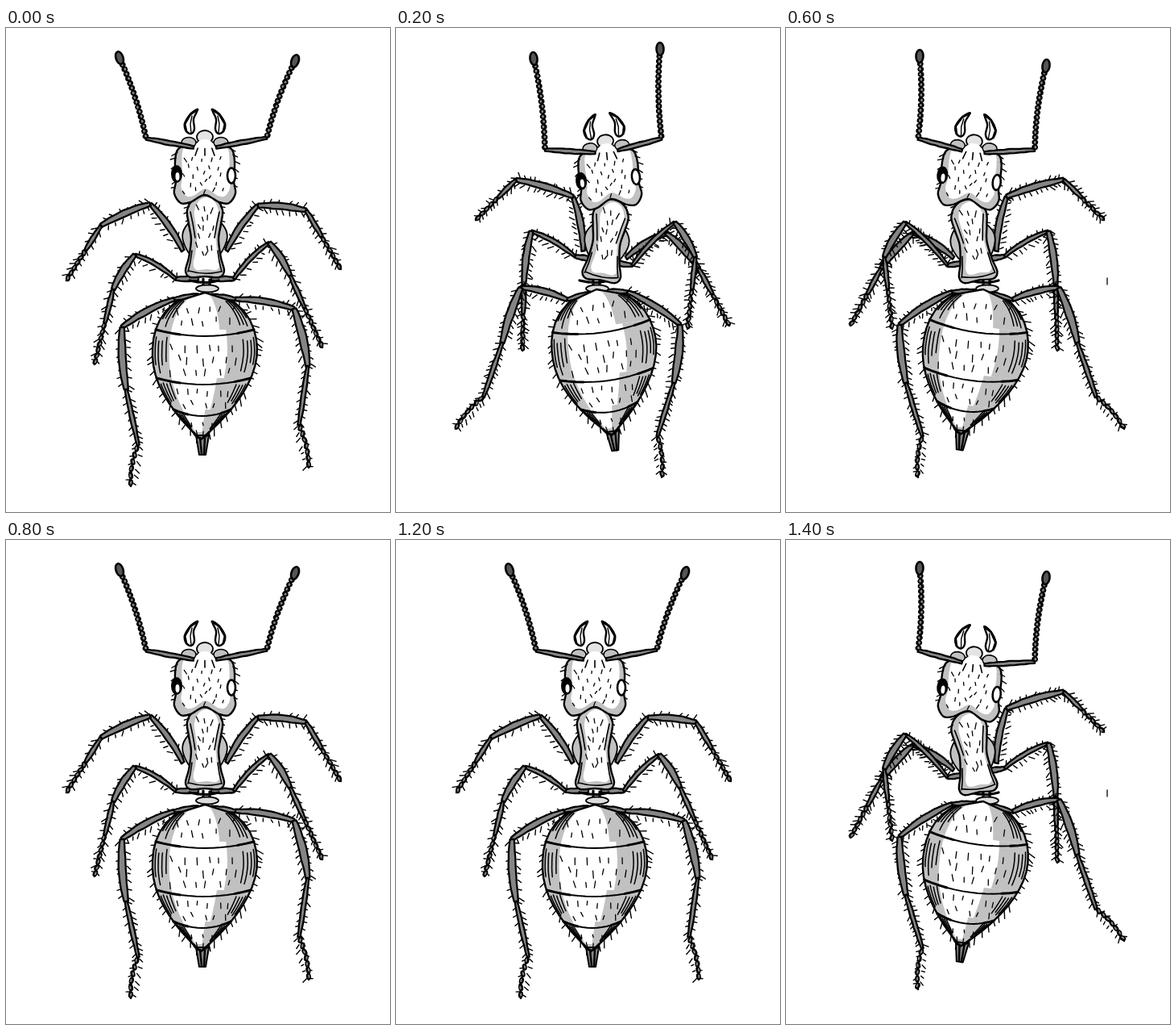
These frames come from a looping animation (477 by 600 pixels, 1.6 s). An HTML page:

```html
<!DOCTYPE html>
<html lang="en">
<head>
<meta charset="utf-8">
<title>Walking ant</title>
<style>
html, body { margin: 0; width: 100%; height: 100%; overflow: hidden; background: #fff; }
svg { display: block; }
</style>
</head>
<body>
<svg id="stage" width="477" height="600" viewBox="0 0 477 600"></svg>
<script>
const NS = 'http://www.w3.org/2000/svg';
const stage = document.getElementById('stage');
const INK = '#000', LIGHT = '#c1c1c1', DARK = '#858585';
const STEP = 200, AXIS = 247;

let seed = 7;
function rnd() {
  seed = (seed * 16807) % 2147483647;
  return seed / 2147483647;
}
const jitter = r => (rnd() - 0.5) * 2 * r;
const range = (n, fn) => Array.from({ length: n }, (_, i) => fn(i));
const lerp = (a, b, t) => [a[0] + (b[0] - a[0]) * t, a[1] + (b[1] - a[1]) * t];
const fmt = p => p.map(v => v.toFixed(1)).join(' ');
const poly = pts => 'M' + pts.map(fmt).join('L');

function add(parent, tag, attrs) {
  const node = document.createElementNS(NS, tag);
  for (const k in attrs) node.setAttribute(k, attrs[k]);
  if (parent) parent.appendChild(node);
  return node;
}
const fill = (g, d, color) => add(g, 'path', { d, fill: color });
const line = (g, d, width = 1.6) => add(g, 'path', {
  d, fill: 'none', stroke: INK, 'stroke-width': width,
  'stroke-linecap': 'round', 'stroke-linejoin': 'round'
});
const shape = (g, d, color, width = 2) => add(g, 'path', {
  d, fill: color, stroke: INK, 'stroke-width': width, 'stroke-linejoin': 'round'
});
const ellipse = (g, cx, cy, rx, ry, color, width = 0) => add(g, 'ellipse', {
  cx, cy, rx, ry, fill: color, stroke: INK, 'stroke-width': width
});

// Closed smooth curve through the points.
function smooth(pts) {
  const n = pts.length, at = i => pts[(i + n) % n];
  const pull = (i, s) => at(i).map((v, k) => v + s * (at(i + 1)[k] - at(i - 1)[k]) / 6);
  return 'M' + fmt(at(0)) + range(n, i => `C${fmt(pull(i, 1))} ${fmt(pull(i + 1, -1))} ${fmt(at(i + 1))}`).join('') + 'Z';
}
// Points given as distance from the body axis, placed on one side.
const onSide = (pts, side) => pts.map(([x, y]) => [AXIS + side * x, y]);
const bilateral = half => smooth([...onSide(half, 1), ...onSide(half.slice(1, -1).reverse(), -1)]);

// Point and unit normal on a line bowed sideways.
function bowed(a, b, bow, t) {
  const dx = b[0] - a[0], dy = b[1] - a[1], m = Math.hypot(dx, dy) || 1;
  const normal = [-dy / m, dx / m], lift = bow * 4 * t * (1 - t), [x, y] = lerp(a, b, t);
  return { p: [x + normal[0] * lift, y + normal[1] * lift], normal, length: m };
}

// Bristles of uneven length on one side of a path.
function bristles(g, pts, step, size, side, offset = 0) {
  const path = add(null, 'path', { d: poly(pts) }), length = path.getTotalLength();
  let out = '';
  for (let s = step * rnd(); s < length - 1; s += step * (0.7 + rnd() * 0.6)) {
    const a = path.getPointAtLength(s), b = path.getPointAtLength(s + 1);
    const ux = b.x - a.x, uy = b.y - a.y, nx = -uy * side, ny = ux * side;
    const lean = 0.6 + jitter(0.5), len = size * (0.6 + rnd() * 0.7);
    out += `M${fmt([a.x + nx * offset, a.y + ny * offset])}l${fmt([(nx + ux * lean) * len, (ny + uy * lean) * len])}`;
  }
  line(g, out, 1.4);
}

// Short hairs scattered in a grid, splaying away from the axis.
function fur(g, id, halfWidth, y0, y1, dx, dy, size) {
  let out = '', row = 0;
  for (let y = y0; y <= y1; y += dy, row++) {
    for (let x = -halfWidth + (row % 2) * dx / 2; x <= halfWidth; x += dx) {
      const lean = -x / halfWidth * 1.5 + jitter(2);
      out += `M${fmt([AXIS + x + jitter(3), y + jitter(3)])}l${fmt([lean, size * (0.7 + rnd() * 0.5)])}`;
    }
  }
  line(g, out, 1.3).setAttribute('clip-path', `url(#${id}Clip)`);
}

const defs = add(stage, 'defs', {});
function part(id, outline) {
  add(add(defs, 'clipPath', { id: id + 'Clip' }), 'path', { d: outline });
  const g = add(defs, 'g', { id });
  return { g, shade: add(g, 'g', { 'clip-path': `url(#${id}Clip)` }) };
}
// Grey body with a smaller copy of the outline as its highlight.
function roundShade(g, d, cy, sx, sy, dx, dy) {
  fill(g, d, LIGHT);
  fill(g, d, '#fff').setAttribute('transform',
    `translate(${AXIS + dx} ${cy + dy}) scale(${sx} ${sy}) translate(${-AXIS} ${-cy})`);
}

function makeHead() {
  const half = [[0, 142], [14, 142], [33, 150], [37, 166], [36, 190], [38, 205], [30, 217], [18, 216], [0, 207]];
  const jaw = [[9, 101], [18, 107], [25, 119], [23, 128], [17, 131], [13, 125], [14, 113]];
  const outline = bilateral(half);
  const { g, shade } = part('head', outline);
  roundShade(shade, outline, 180, 0.8, 0.9, 1, -5);
  for (const side of [1, -1]) {
    bristles(g, onSide(half.slice(2, 6), side), 9, 5, -side);
    const d = smooth(onSide(jaw, side));
    shape(g, d, '#fff', 2.4);
    line(g, poly(onSide(jaw.slice(0, 4), side)), 2.8);
    line(g, poly(onSide([[16, 109], [18, 119], [17, 130]], side)), 1.4);
  }
  line(g, outline, 2.4);
  fur(g, 'head', 26, 160, 201, 12, 10, 4);
  for (const k of [-1, 0, 1]) line(g, poly([[AXIS + k * 7, 144], [AXIS + k * 12, 158]]));
  ellipse(g, AXIS, 135, 10, 8, '#e4e4e4', 1.8);
  for (const side of [1, -1]) ellipse(g, AXIS + side * 20, 142, 9, 6.5, LIGHT, 1.6);
  fill(g, smooth([[AXIS - 11, 148], [AXIS - 7, 140], [AXIS, 138], [AXIS + 7, 140], [AXIS + 11, 148]]), '#fff');
  ellipse(g, 212, 181, 7, 11, INK);
  ellipse(g, 213, 184, 2.5, 5, '#fff');
  ellipse(g, 280, 183, 5, 9.5, '#fff', 2.6);
}

function makeThorax() {
  const half = [[0, 207], [14, 212], [22, 226], [20, 243], [17, 262], [20, 285], [24, 301], [18, 309], [0, 308]];
  const outline = bilateral(half);
  const { g, shade } = part('thorax', outline);
  for (const side of [1, -1]) {
    g.prepend(shape(g, smooth(onSide([[17, 242], [26, 250], [27, 264], [18, 279]], side)), LIGHT, 1.8));
    bristles(g, onSide(half.slice(1, 4), side), 8, 4, -side);
    line(g, poly(onSide([[18, 228], [15, 242], [12, 260]], side)));
    line(g, poly(onSide([[16, 276], [18, 290], [21, 302]], side)));
  }
  roundShade(shade, outline, 258, 0.68, 0.88, 2, -3);
  line(g, outline, 2.4);
  line(g, `M${AXIS - 20} 301Q${AXIS} 307 ${AXIS + 20} 302`);
  fur(g, 'thorax', 11, 220, 290, 11, 12, 6);
}

// Egg-shaped abdomen: x at height y, for k from -1 (left edge) to 1 (right edge).
const TOP = 328, WIDEST = 402, TAIL = 510;
function egg(k, y) {
  const u = (y - WIDEST) / (TAIL - WIDEST), v = (WIDEST - y) / (WIDEST - TOP);
  const half = 65 * (v > 0 ? Math.sqrt(1 - v ** 2.2) : 1 - u ** 1.9);
  return [AXIS - Math.max(0, u) * 5 + k * half, y];
}
const meridian = (k, y0, y1) => range(17, i => egg(k, y0 + (y1 - y0) * i / 16));
const band = y => range(13, i => {
  const k = i / 6 - 1, [x] = egg(k, y);
  return [x, y + 8 * (1 - k * k)];
});

function makeGaster() {
  const seams = [TOP, 374, 434, 473, 501];
  const shadeFrom = [0.3, 0.43, 0.28, 0.1];
  const outline = poly([...meridian(1, TOP, TAIL), ...meridian(-1, TAIL, TOP)]) + 'Z';
  const { g, shade } = part('gaster', outline);
  shape(g, `M236 505L240 529H248L252 505Z`, DARK);
  line(g, 'M241 508L243 528M247 508L246 529', 2.4);
  fill(shade, outline, '#fff');
  seams.forEach((y, i) => {
    const y1 = seams[i + 1] || TAIL, from = shadeFrom[i] ?? -1;
    for (const [a, b] of [[-1, -0.68], [from, 1]]) {
      fill(shade, poly([...meridian(a, y, y1), ...meridian(b, y1, y)]) + 'Z', LIGHT);
    }
  });
  for (const side of [1, -1]) {
    bristles(g, meridian(side, 345, TAIL - 2), 9, 6, -side);
    seams.slice(0, 4).forEach((y, i) => {
      const gap = seams[i + 1] - y;
      for (const k of [0.95, 0.89, 0.82, 0.74]) {
        const start = y + gap * (0.14 + rnd() * 0.1), end = y + gap * (0.65 + rnd() * 0.28);
        line(shade, poly(meridian(side * k, start, end)), 1.5);
      }
    });
  }
  line(g, outline, 2.4);
  seams.slice(1).forEach(y => {
    const seam = band(y);
    line(g, poly(seam), 2);
    for (const end of [seam.slice(0, 4), seam.slice(-3)]) line(g, poly(end), 3);
  });
  fur(g, 'gaster', 38, 346, 368, 15, 15, 7);
  fur(g, 'gaster', 42, 392, 426, 15, 16, 8);
  fur(g, 'gaster', 34, 450, 468, 13, 14, 6);
  fur(g, 'gaster', 14, 488, 498, 10, 10, 5);
}

function bone(g, a, b, w, bow = 0) {
  const edge = side => range(11, i => {
    const t = i / 10, { p, normal } = bowed(a, b, bow, t);
    const r = side * (w * (0.6 + 0.45 * Math.sin(Math.PI * t)) + jitter(0.3));
    return [p[0] + normal[0] * r, p[1] + normal[1] * r];
  });
  shape(g, poly([...edge(1), ...edge(-1).reverse()]) + 'Z', DARK, 2.3);
}

function beads(g, a, b, size, step, bow = 0) {
  const n = Math.max(2, Math.round(bowed(a, b, 0, 0).length / step));
  line(g, poly(range(n + 1, i => bowed(a, b, bow, i / n).p)), 2.5);
  range(n, i => {
    const { p, normal } = bowed(a, b, bow, (i + 0.5) / n);
    const turn = Math.atan2(-normal[0], normal[1]) * 180 / Math.PI + jitter(25);
    const bead = add(g, 'g', { transform: `translate(${fmt(p)}) rotate(${turn.toFixed(0)})` });
    ellipse(bead, 0, 0, step * 0.55, size, INK);
    ellipse(bead, 0, jitter(0.8), step * 0.28, size * 0.36, DARK);
  });
}

// Half widths of femur and tibia for front, middle and hind legs.
const GIRTH = [[3.6, 3.8], [2.6, 3.8], [3.6, 4.4]];

function leg(g, rank, side, [hip, knee, ankle, toe], gap) {
  const hind = rank === 2, [femur, tibia] = GIRTH[rank];
  const split = bowed(ankle, toe, hind ? side * 12 : 0, hind ? 0.58 : 0.45).p;
  const hairy = (a, b, w) => {
    for (const s of [1, -1]) bristles(g, [a, b], gap, 4.5, s, w);
  };
  hairy(hip, knee, femur);
  hairy(knee, ankle, tibia);
  hairy(ankle, split, 2.4);
  hairy(split, toe, 2);
  bone(g, hip, knee, femur, side * -3);
  bone(g, knee, ankle, tibia, side * -2);
  bone(g, ankle, split, 2.5);
  beads(g, split, toe, 3, 8, hind ? side * -3 : 0);
}

function antenna(g, side, base, elbow, tip) {
  bone(g, base, elbow, 2.6);
  beads(g, elbow, tip, 3.9, 6.2, side * -3);
  const { normal } = bowed(elbow, tip, 0, 1);
  const turn = Math.atan2(-normal[0], normal[1]) * 180 / Math.PI;
  const bulb = add(g, 'g', { transform: `translate(${tip}) rotate(${turn.toFixed(0)})` });
  ellipse(bulb, 0, 0, 8, 4.5, '#555', 2.6);
}

const PIVOT = { gaster: [247, 328], thorax: [247, 258], head: [247, 182] };

// Each part has a shift and a turn. A leg has a knee, ankle and toe, front to
// hind; an antenna has an elbow and tip. The left side comes first.
const still = {
  head: [0, 0, 0], thorax: [0, 0, 0], gaster: [0, 0, 0], coxa: 311, gap: 9,
  antennae: [[[174, 137], [141, 37]], [[324, 136], [359, 41]]],
  legs: [
    [[[179, 218], [118, 245], [75, 313]], [[160, 281], [133, 324], [110, 417]], [[144, 371], [149, 448], [155, 568]]],
    [[[313, 220], [373, 226], [416, 299]], [[327, 266], [353, 307], [393, 396]], [[358, 348], [375, 419], [376, 545]]]
  ]
};
const stride = {
  head: [-18, 5, 6], thorax: [-15, 5, -9], gaster: [-2, -4, 7.5], coxa: 284, gap: 7,
  antennae: [[[164, 137], [166, 35]], [[309, 151], [323, 47]]],
  legs: [
    [[[158, 254], [118, 298], [80, 369]], [[148, 241], [122, 284], [132, 373]], [[141, 368], [149, 440], [164, 557]]],
    [[[274, 209], [345, 188], [395, 238]], [[326, 252], [335, 318], [337, 400]], [[339, 322], [362, 390], [420, 497]]]
  ],
  mark: 'M399 310V318'
};

// The opposite stride, with joints reflected and sides exchanged.
function reflect(pose) {
  const flip = pts => pts.map(([x, y]) => [2 * AXIS - x, y]);
  const turn = ([x, y, a]) => [-x, y, -a];
  return {
    ...pose, mark: '',
    head: turn(pose.head), thorax: turn(pose.thorax), gaster: turn(pose.gaster),
    antennae: pose.antennae.map(([elbow, [x, y]]) => flip([elbow, [x, y - 9]])).reverse(),
    legs: pose.legs.map(legs => legs.map(flip)).reverse()
  };
}

function draw(pose) {
  const g = add(stage, 'g', { visibility: 'hidden' });
  const place = id => add(g, 'use', {
    href: '#' + id,
    transform: `translate(${pose[id].slice(0, 2)}) rotate(${pose[id][2]} ${PIVOT[id]})`
  });
  const attach = (id, side, x, y) => {
    const [dx, dy, turn] = pose[id], [px, py] = PIVOT[id], a = turn * Math.PI / 180;
    const u = side * x, v = y - py;
    return [px + dx + u * Math.cos(a) - v * Math.sin(a), py + dy + u * Math.sin(a) + v * Math.cos(a)];
  };
  const sides = [-1, 1];
  sides.forEach((side, i) => {
    const hips = [attach('thorax', side, 27, 276), attach('thorax', side, 36, pose.coxa), attach('gaster', side, 38, 336)];
    bone(g, attach('thorax', side, 8, pose.coxa), hips[1], 3);
    bone(g, attach('gaster', side, 8, 331), hips[2], 2.6);
    pose.legs[i].forEach((pts, rank) => leg(g, rank, side, [hips[rank], ...pts], pose.gap));
  });
  line(g, 'M228 313Q248 318 264 313M245 311V323M253 312V322', 3.2);
  ellipse(g, 250, 323, 14, 4.5, '#ddd', 1.8);
  ['gaster', 'thorax', 'head'].forEach(place);
  sides.forEach((side, i) => antenna(g, side, attach('head', side, 14, 148), ...pose.antennae[i]));
  if (pose.mark) line(g, pose.mark, 1.3);
  return g;
}

makeHead();
makeThorax();
makeGaster();
const mid = draw(still), toLeft = draw(stride), toRight = draw(reflect(stride));
const cycle = [mid, toRight, mid, toLeft];

let start = null;
function render(now) {
  if (start === null) start = now;
  const shown = cycle[Math.floor((now - start) / STEP) % cycle.length];
  for (const g of [mid, toLeft, toRight]) g.setAttribute('visibility', g === shown ? 'visible' : 'hidden');
  requestAnimationFrame(render);
}
mid.setAttribute('visibility', 'visible');
requestAnimationFrame(render);
</script>
</body>
</html>
```
